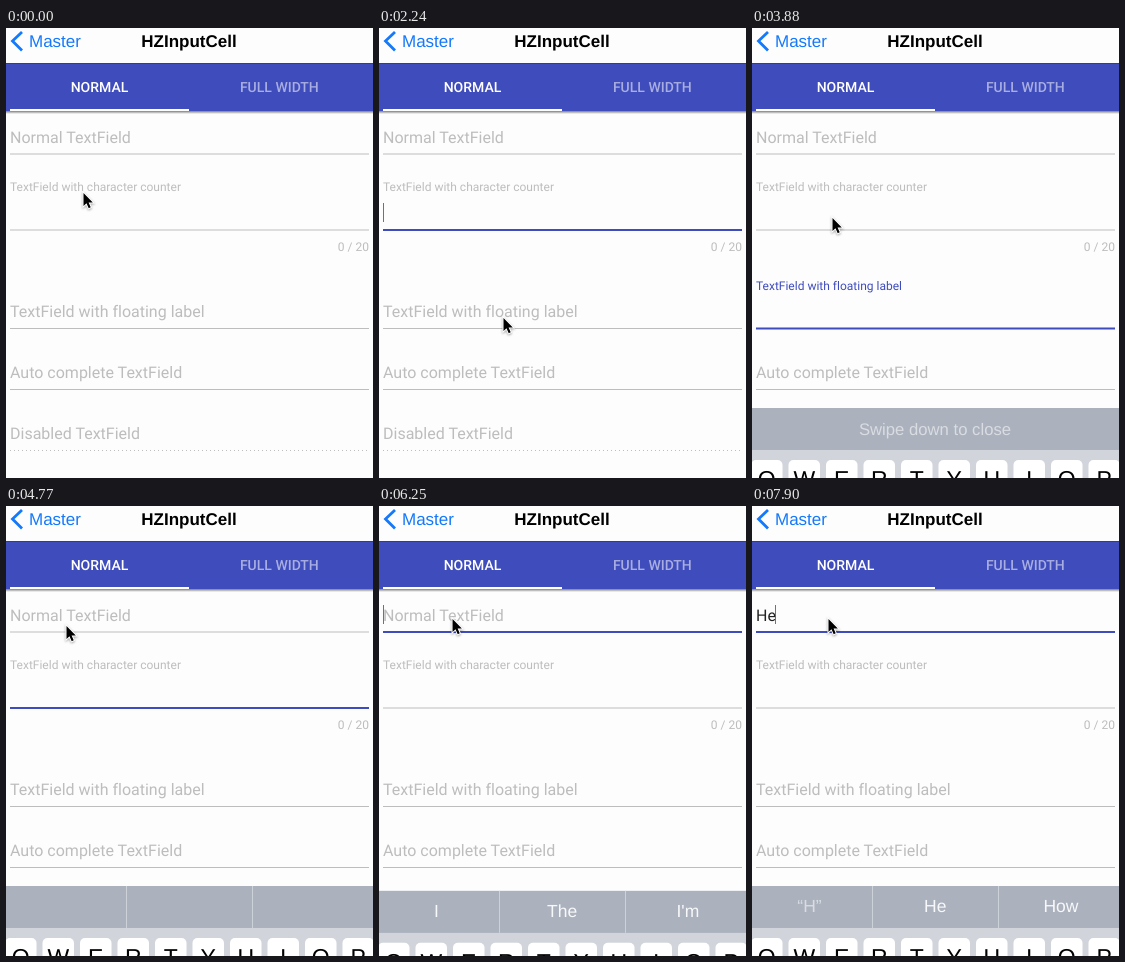
Recreate the animation shown at these times as an HTML page. Size 367 px wide and 450 px high, loop 8000 ms.

```html
<!DOCTYPE html>
<html lang="en">
<head>
<meta charset="utf-8">
<title>Text fields</title>
<style>
  html, body { margin: 0; width: 100%; height: 100%; overflow: hidden; background: #fdfdfd; }
  svg { display: block; width: 367px; height: 450px; }
  text {
    font: 16px Roboto, sans-serif; fill: #bdbdbd; white-space: pre;
    font-variant-ligatures: none; text-rendering: geometricPrecision;
  }
  .small { font-size: 12px; }
  .tab { font-size: 14px; font-weight: 500; fill: #fff; text-anchor: middle; }
  .ios { font: 17px "Liberation Sans", Arial, sans-serif; }
  .mid { text-anchor: middle; }
  .hint { font-size: 17.5px; fill: #f7f8f9; }
  .dim { fill: #d9dce1; }
  .key { font-size: 23px; fill: #000; }
  .accent { fill: #3f4cbc; }
  .rule { fill: #bdbdbd; }
</style>
</head>
<body>
<svg viewBox="0 0 367 450">
  <defs>
    <linearGradient id="shade" x2="0" y2="1">
      <stop stop-color="#000" stop-opacity=".5"/>
      <stop offset="1" stop-color="#000" stop-opacity="0"/>
    </linearGradient>
  </defs>
  <rect width="367" height="450" fill="#fdfdfd"/>

  <path d="M16 4L6.5 13L16 22.5" fill="none" stroke="#1479fb" stroke-width="2.8"/>
  <text class="ios" x="23" y="19" style="fill:#1479fb">Master</text>
  <text class="ios mid" x="183" y="19" style="fill:#000;font-weight:700">HZInputCell</text>

  <rect y="83" width="367" height="3" fill="url(#shade)"/>
  <rect class="accent" y="35" width="367" height="48"/>
  <rect y="35" width="367" height="1" fill="#333b8c"/>
  <rect x="4" y="81" width="179" height="2" fill="#fff"/>
  <text class="tab" x="93.5" y="64">NORMAL</text>
  <text class="tab" x="273.3" y="64" fill-opacity=".55">FULL WIDTH</text>

  <text id="placeholder" x="4" y="114.5">Normal TextField</text>
  <text id="typed" x="4" y="114.5" style="fill:#222"></text>
  <text class="small" x="4" y="163">TextField with character counter</text>
  <text class="small" x="363" y="223" text-anchor="end">0 / 20</text>
  <text id="floating">TextField with floating label</text>
  <text x="4" y="349.5">Auto complete TextField</text>
  <text x="4" y="410.5">Disabled TextField</text>
  <g id="rules"></g>
  <rect class="rule" x="4" y="361" width="359" height="1"/>
  <path d="M4 422.5H363" stroke="#bdbdbd" stroke-dasharray="1 3"/>
  <rect id="caret" class="accent" width="1" height="19"/>

  <g id="keyboard">
    <rect y="380" width="367" height="260" fill="#d1d5db"/>
    <rect y="380" width="367" height="42" fill="#abb1bd"/>
    <path id="dividers" d="M120.5 380V422M246.5 380V422" stroke="#cdd1d8"/>
    <g id="hints"></g>
    <text id="swipe" class="ios mid dim" x="183" y="407" style="font-size:16.7px">Swipe down to close</text>
    <g id="keys"></g>
  </g>

  <path id="pointer" d="M0 0V13L3 10.2L5.2 15.2L7.2 14.3L5.1 9.5H9.3Z"
    stroke="#fff" stroke-width="2" paint-order="stroke" style="filter:drop-shadow(0 1px 1px rgba(0,0,0,.35))"/>
</svg>
<script>
  const LOOP = 8000, FIRST = 1190, STEP = 148.7;
  const $ = id => document.getElementById(id);

  function add(parent, name, attrs, text = '') {
    const el = document.createElementNS('http://www.w3.org/2000/svg', name);
    set(el, attrs);
    el.textContent = text;
    return parent.appendChild(el);
  }

  function set(el, attrs) {
    for (const key in attrs) el.setAttribute(key, attrs[key]);
  }

  const show = (el, on) => set(el, { visibility: on ? 'visible' : 'hidden' });
  const clamp = v => Math.min(1, Math.max(0, v));
  const smooth = v => v * v * (3 - 2 * v);
  const ramp = (t, start, length) => smooth(clamp((t - start) / length));

  [...'QWERTYUIOP'].forEach((letter, i) => {
    const x = 37.5 * i - 1;
    add($('keys'), 'rect', { x, y: 432, width: 31.5, height: 42, rx: 5, fill: '#fff' });
    add($('keys'), 'text', { x: x + 15.75, y: 459, class: 'ios mid key' }, letter);
  });

  const hints = [0, 1, 2].map(i =>
    add($('hints'), 'text', { x: 57.5 + 125.7 * i, y: 406, class: 'ios mid hint' }));

  const fields = [126, 202, 300.5].map(line => ({
    line, el: add($('rules'), 'rect', { x: 4, width: 359 })
  }));

  const COUNTER = 1, FLOATING = 2, NORMAL = 0, NONE = -1;
  const taps = [
    { at: 1930, field: COUNTER },
    { at: 2375, field: FLOATING },
    { at: 4010, field: COUNTER },
    { at: 5050, field: NONE },
    { at: 5945, field: NORMAL }
  ];
  const [, floatTap, returnTap, closeTap, lastTap] = taps.map(tap => tap.at);
  const FIRST_OPEN = 2240, TYPING = 7580, SUGGEST = 7700;

  const home = { x: 77.5, y: 165 };
  const moves = [
    { from: 1040, to: 1640, x: 95.5, y: 189 },
    { from: 1930, to: 2230, x: 124.5, y: 290 },
    { from: 3120, to: 3870, x: 80.5, y: 190 },
    { from: 4310, to: 4755, x: 60.5, y: 120 },
    { from: 5350, to: 5650, x: 70.5, y: 113 },
    { from: 5945, to: 6540, x: 76.5, y: 113 }
  ];

  function pointerAt(t) {
    let { x, y } = home;
    for (const move of moves) {
      const k = ramp(t, move.from, move.to - move.from);
      x += (move.x - x) * k;
      y += (move.y - y) * k;
    }
    return `translate(${x} ${y})`;
  }

  // Solid, then a short fade, then dark until the next blink.
  const blink = age => 1 - clamp((age % 770 - 280) / 120);

  function keyboardDrop(t) {
    if (t > closeTap && t < lastTap) return 258;
    const opened = t < closeTap ? FIRST_OPEN : lastTap;
    return 258 * (1 - clamp((t - opened) / 410)) ** 3;
  }

  function suggestions(t) {
    if (t < lastTap) return ['', '', ''];
    return t < SUGGEST ? ['I', 'The', 'I\'m'] : ['“H”', 'He', 'How'];
  }

  function draw(time) {
    // The picture refreshes in discrete steps.
    const step = Math.floor((time % LOOP - FIRST) / STEP);
    const t = step < 0 ? 0 : FIRST + step * STEP;
    const tap = taps.filter(({ at }) => at <= t).pop() || { at: 0, field: NONE };

    fields.forEach(({ line, el }, i) => {
      const height = i === tap.field ? 2 : 1;
      set(el, { class: height > 1 ? 'accent' : 'rule', y: line - height / 2, height });
    });

    const typed = t < TYPING ? '' : 'He'.slice(0, 1 + Math.floor((t - TYPING) / 290));
    $('typed').textContent = typed;
    show($('placeholder'), !typed);

    const up = ramp(t, floatTap, 200) - ramp(t, returnTap, 200);
    set($('floating'), {
      transform: `translate(4 ${289 - 27 * up}) scale(${1 - up / 4})`,
      class: tap.field === FLOATING ? 'accent' : ''
    });
    $('floating').style.fill = tap.field === FLOATING ? '#3f4cbc' : '';

    const caret = $('caret');
    show(caret, tap.field !== NONE);
    if (tap.field !== NONE) {
      set(caret, {
        x: 4 + (typed ? Math.floor($('typed').getComputedTextLength()) : 0),
        y: Math.floor(fields[tap.field].line - 27),
        opacity: blink(t - (typed ? TYPING : tap.at))
      });
    }

    set($('keyboard'), { transform: `translate(0 ${keyboardDrop(t)})` });
    show($('swipe'), t < returnTap);
    show($('dividers'), t >= returnTap);
    suggestions(t).forEach((word, i) => { hints[i].textContent = word; });
    hints[0].classList.toggle('dim', t >= SUGGEST);

    set($('pointer'), { transform: pointerAt(t) });
  }

  const start = performance.now();
  function tick() {
    draw(performance.now() - start);
    requestAnimationFrame(tick);
  }
  tick();
</script>
</body>
</html>
```
